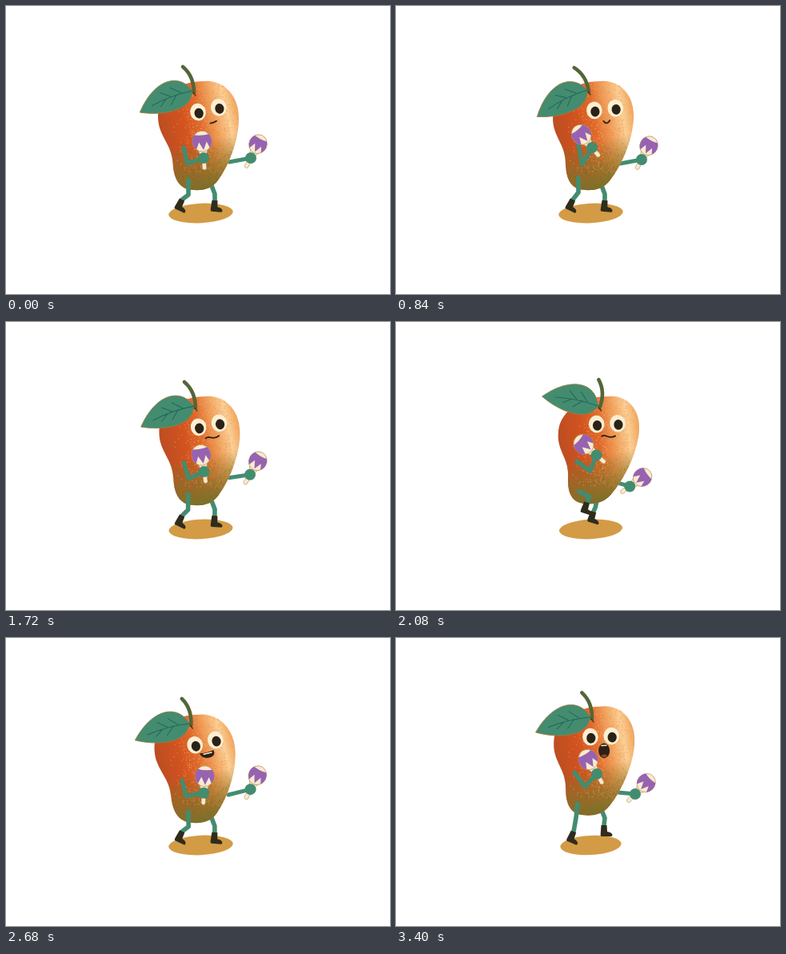
Recreate the animation shown at these times as an HTML page with a canvas. Size 480 by 360 pixels, loop 3440 ms.

```html
<!DOCTYPE html>
<html lang="en">
<head>
<meta charset="utf-8">
<title>Dancing mango</title>
<style>
  html, body { margin: 0; width: 100%; height: 100%; overflow: hidden; background: #fff; }
  canvas { display: block; width: 480px; height: 360px; }
</style>
</head>
<body>
<canvas id="stage" width="480" height="360"></canvas>
<script>
const ctx = document.getElementById('stage').getContext('2d');
const LOOP = 3440, STEP = 1720, FRAME = 40;
const GREEN = '#438c70', VEIN = '#24695a', BOOT = '#302c1c', INK = '#2b2216';
const CREAM = '#f9ead0', PURPLE = '#9763b0', EDGE = '#b58a4c';

// body: shift x, shift y, lean, height   stem: x, y, angle   face: x, y, angle
// arms and legs: joint points, then the angle of the maraca or boot
const apart = {
  body: [0, 0, 0, 1], stem: [235, 108, -.41], leaf: [.39], face: [254, 131, -.22],
  armL: [222, 177, 227, 197, 247, 190, -.09], armR: [279, 195, 306, 190, .48],
  legL: [228, 217, 228, 236, 220, 242, .45], legR: [256, 222, 261, 235, 261, 243, .08]
};
const left = {
  ...apart, body: [-1, 1, -.04, .995], stem: [231, 109, -.36], leaf: [.33], face: [250, 132, -.24],
  armL: [220, 178, 225, 198, 247, 194, .06], armR: [278, 196, 306, 189, .46]
};
const land = {
  ...apart, body: [2, 0, .045, 1], stem: [241, 107, -.55], leaf: [.49], face: [262, 130.5, -.1],
  armL: [228, 174, 233, 198, 245, 177, -.69], armR: [280, 197, 307, 192, .48],
  legL: [228, 215, 228, 233, 221, 242, .45]
};
const cross = {
  body: [3, -1, .112, .98], stem: [254, 110, -.1], leaf: [-.19], face: [264, 128, -.05],
  armL: [226, 175, 243, 186, 260, 170, -.5], armR: [278, 204, 292, 207, .96],
  legL: [227, 213, 234, 233, 235, 248, 0], legR: [252, 226, 248, 233, 243, 237, .28]
};
const skip = {
  body: [3, -3, .112, .985], stem: [255, 107, -.03], leaf: [-.18], face: [265, 128.5, -.03],
  armL: [226, 174, 243, 186, 251, 166, -.88], armR: [279, 202, 292, 206, .96],
  legL: [229, 212, 242, 218, 239, 225, .3], legR: [251, 222, 249, 231, 246, 237, .3]
};
const kick = {
  body: [0, -13, -.01, 1], stem: [225, 96, -.8], leaf: [.75], face: [256, 116, -.4],
  armL: [222, 166, 209, 182, 224, 196, 1.03], armR: [283, 174, 305, 157, .05],
  legL: [232, 207, 230, 225, 226, 243, .25], legR: [264, 205, 265, 211, 259, 218, .5]
};
const peak = {
  ...kick, body: [1, -14, .02, 1], stem: [234, 92, -.55], leaf: [.68], face: [259, 117, -.25],
  armL: [225, 166, 222, 187, 236, 188, .1], armR: [282, 182, 307, 172, .3],
  legL: [230, 206, 228, 224, 224, 242, .32], legR: [261, 209, 264, 218, 261, 227, .3]
};
const drop = {
  body: [1.5, -8.5, .063, 1], stem: [245, 101, -.37], leaf: [.27], face: [257, 124.5, -.04],
  armL: [223, 168, 236, 186, 251, 170, -.54], armR: [277, 193, 299, 195, .78],
  legL: [227, 207, 225, 225, 222, 242, .4], legR: [257, 215, 261, 225, 260, 234, 0]
};
const hop = {
  ...drop, body: [2, -15, .075, 1], stem: [246, 94, -.25], leaf: [.42], face: [261, 118, -.08],
  armL: [225, 163, 236, 181, 252, 166, -.5], armR: [279, 187, 299, 190, .75],
  legL: [229, 202, 228, 222, 227, 241, .2], legR: [260, 208, 265, 214, 261, 221, .3]
};

const keys = [[0, apart], [90, left], [370, skip], [500, cross], [708, kick], [770, peak],
  [840, land], [930, left], [1228, skip], [1360, cross], [1600, hop], [1668, drop]];
const faces = [[0, 'flat'], [480, 'smile'], [1120, 'shut'], [1640, 'wavy'],
  [2120, 'grin'], [2760, 'oh'], [3200, 'wow']];

const keyAt = i => {
  const n = keys.length, turn = Math.floor(i / n), [t, pose] = keys[i - turn * n];
  return { t: t + turn * STEP, pose };
};

// Smooth interpolation without overshoot
function poseAt(p) {
  let i = keys.length - 1;
  while (keys[i][0] > p) i--;
  const [a, b, c, d] = [-1, 0, 1, 2].map(o => keyAt(i + o));
  const span = c.t - b.t, u = (p - b.t) / span, out = {};
  const bend = (s, r) => s * r <= 0 ? 0 : 2 * s * r / (s + r);
  for (const part in b.pose) {
    out[part] = b.pose[part].map((from, j) => {
      const val = k => k.pose[part][j], to = val(c);
      const mid = (to - from) / span;
      const m0 = bend((from - val(a)) / (b.t - a.t), mid) * span;
      const m1 = bend(mid, (val(d) - to) / (d.t - c.t)) * span;
      const u2 = u * u, u3 = u2 * u;
      return from * (2 * u3 - 3 * u2 + 1) + m0 * (u3 - 2 * u2 + u)
        + to * (3 * u2 - 2 * u3) + m1 * (u3 - u2);
    });
  }
  return out;
}

function seeded(s) {
  return () => (s = (s * 16807) % 2147483647) / 2147483647;
}
const rnd = seeded(77);
const specks = Array.from({ length: 1100 }, (_, i) => {
  const low = i % 2, spread = rnd() + rnd() + rnd() - 1.5;
  return low
    ? [190 + rnd() * 100, 204 + spread * 26, '#75702b']
    : [256 + spread * 34, 96 + rnd() * 112, spread < 0 ? '#f9c183' : '#ea853d'];
});

const mango = new Path2D('M248 94C272 92 291 112 291 140C291 170 278 200 265 218C257 229 245 231 235 230' +
  'C218 230 211 218 209 202C208 182 203 176 197 164C191 152 190 146 190 136C191 112 215 94 248 94Z');
const leafShape = new Path2D('M0 0C-7 -29 -40 -31 -71 0C-48 14 -10 24 0 0Z');
const veins = new Path2D('M0 0Q-28 -5 -54 -2M-14 -3L-24 -14M-28 -4L-38 -13M-20 -3L-31 6M-34 -3L-44 3');
const bootShape = new Path2D('M-3.5 0L3.5 0L4 8Q10 9 10.5 12Q10.5 14 9 14L-3 14Q-4.5 14 -4.3 11Z');
const handle = new Path2D('M-2.6 13Q0 17 2.6 13L2.4 0L7 -13L-7 -13L-2.4 0Z');
const band = new Path2D('M-14 -31Q0 -26 14 -31L14 -16L10 -10L5.5 -20L1 -10L-4 -20L-8.5 -10L-14 -18Z');

function oval(x, y, rx, ry, fill, turn = 0) {
  ctx.beginPath();
  ctx.ellipse(x, y, rx, ry, turn, 0, 7);
  ctx.fillStyle = fill;
  ctx.fill();
}

function line(points, width, color) {
  ctx.beginPath();
  for (let i = 0; i < points.length; i += 2) ctx.lineTo(points[i], points[i + 1]);
  stroke(width, color);
}

function stroke(width, color, path) {
  ctx.lineWidth = width;
  ctx.strokeStyle = color;
  path ? ctx.stroke(path) : ctx.stroke();
}

function fill(path, color) {
  ctx.fillStyle = color;
  ctx.fill(path);
}

function placed(x, y, turn, draw, size = 1) {
  ctx.save();
  ctx.translate(x, y);
  ctx.rotate(turn);
  ctx.scale(size, size);
  draw();
  ctx.restore();
}

function ramp(x0, y0, x1, y1, ...stops) {
  const g = ctx.createLinearGradient(x0, y0, x1, y1);
  stops.forEach(([at, color]) => g.addColorStop(at, color));
  return g;
}

const skin = ramp(190, 150, 292, 126, [0, '#bb4d22'], [.3, '#d2531f'], [.5, '#e06b2c'],
  [.68, '#f0a15c'], [.84, '#fbcf95'], [1, '#ee9c52']);
const shade = ramp(228, 172, 240, 230, [0, '#8a752a00'], [.45, '#8a752a88'], [1, '#79702a']);

function drawMango([bx, by, lean, tall]) {
  ctx.save();
  ctx.transform(1, 0, -lean, tall, bx + lean * 230, by + 230 * (1 - tall));
  fill(mango, skin);
  ctx.clip(mango);
  fill(mango, shade);
  ctx.globalAlpha = .5;
  for (const [x, y, color] of specks) {
    ctx.fillStyle = color;
    ctx.fillRect(x, y, 1.1, 1.1);
  }
  ctx.restore();
}

function drawLeg([hx, hy, kx, ky, ax, ay, turn]) {
  line([hx, hy, kx, ky, ax, ay], 5.6, GREEN);
  placed(ax, ay, turn, () => fill(bootShape, BOOT));
}

function drawMaraca(x, y, turn, size) {
  placed(x, y, turn, () => {
    fill(handle, CREAM);
    stroke(.6, EDGE, handle);
    oval(0, -21, 12, 13, CREAM);
    stroke(.7, EDGE);
    ctx.save();
    ctx.clip();
    fill(band, PURPLE);
    ctx.restore();
  }, size);
  oval(x, y, 7, 7, GREEN);
}

function drawStem([x, y, turn], [leafTurn]) {
  placed(x - 2, y - 2, -leafTurn, () => {
    fill(leafShape, GREEN);
    stroke(.8, '#a07c3e', leafShape);
    stroke(1.1, VEIN, veins);
  });
  placed(x, y, turn, () => {
    ctx.beginPath();
    ctx.moveTo(0, 0);
    ctx.quadraticCurveTo(8, -19, 0, -35);
    stroke(4.6, '#536638');
  });
  line([x - 1, y, x + 2, y + 4], 1.4, '#4e3a1c');
}

const mouths = {
  flat() { curve(-2, 15.5, 2, 16, 6, 14.5); },
  smile() { curve(-4, 13, 0, 19, 4, 13); },
  shut() { curve(-4, 13, 0, 18, 4, 13); },
  wavy() {
    ctx.beginPath();
    ctx.moveTo(-8, 14);
    ctx.bezierCurveTo(-3, 10, 0, 19, 9, 14);
    stroke(1.8, INK);
  },
  grin() {
    const lips = new Path2D('M-11 10Q-2 12 7 10Q9 18 0 18Q-9 18 -11 10Z');
    fill(lips, INK);
    line([-6, 12.3, 4, 12.3], 1.6, CREAM);
  },
  oh() { oval(-1, 15.5, 6, 6, INK); },
  wow() {
    oval(2.5, 16.5, 7, 9.3, INK);
    line([-.5, 10, 5.5, 10], 1.6, CREAM);
    oval(2.5, 23, 3.5, 1.8, '#8d4428');
  }
};

function curve(x0, y0, cx, cy, x1, y1) {
  ctx.beginPath();
  ctx.moveTo(x0, y0);
  ctx.quadraticCurveTo(cx, cy, x1, y1);
  stroke(1.8, INK);
}

function drawFace([x, y, turn], mood) {
  placed(x, y, turn, () => {
    for (const side of [-13.2, 13.2]) {
      if (mood === 'shut') {
        ctx.beginPath();
        ctx.arc(side, -3, 10, .05, 3.1);
        stroke(2, INK);
      } else {
        oval(side - .8, -1.5, 9.8, 10.8, '#fbeed2');
        oval(side, .2, 5.6, 6.4, INK);
      }
    }
    mouths[mood]();
  });
}

function draw(t) {
  // the second round runs slightly behind the first
  const p = t < STEP ? t : (t - 12) % STEP;
  const pose = poseAt(p);
  const mood = faces.filter(f => f[0] <= t).pop()[1];
  const lift = Math.min(0, pose.body[1]);

  ctx.fillStyle = '#fff';
  ctx.fillRect(0, 0, 480, 360);
  ctx.lineCap = ctx.lineJoin = 'round';

  oval(243.5, 259, 40.3 + lift * .25, 12.3 + lift * .02, '#d39b46', -.05);
  drawLeg(pose.legR);
  const [sx, sy, hx, hy, turn] = pose.armR;
  line([sx, sy, hx, hy], 5, GREEN);
  drawMango(pose.body);
  drawMaraca(hx, hy, turn, .93);
  drawLeg(pose.legL);
  drawStem(pose.stem, pose.leaf);
  drawFace(pose.face, mood);
  const arm = pose.armL;
  line(arm.slice(0, 6), 5.4, GREEN);
  drawMaraca(arm[4], arm[5], arm[6], 1);
}

const start = performance.now();
function tick() {
  const t = (performance.now() - start) % LOOP;
  draw(Math.floor(t / FRAME) * FRAME);
  requestAnimationFrame(tick);
}
tick();
</script>
</body>
</html>
```
